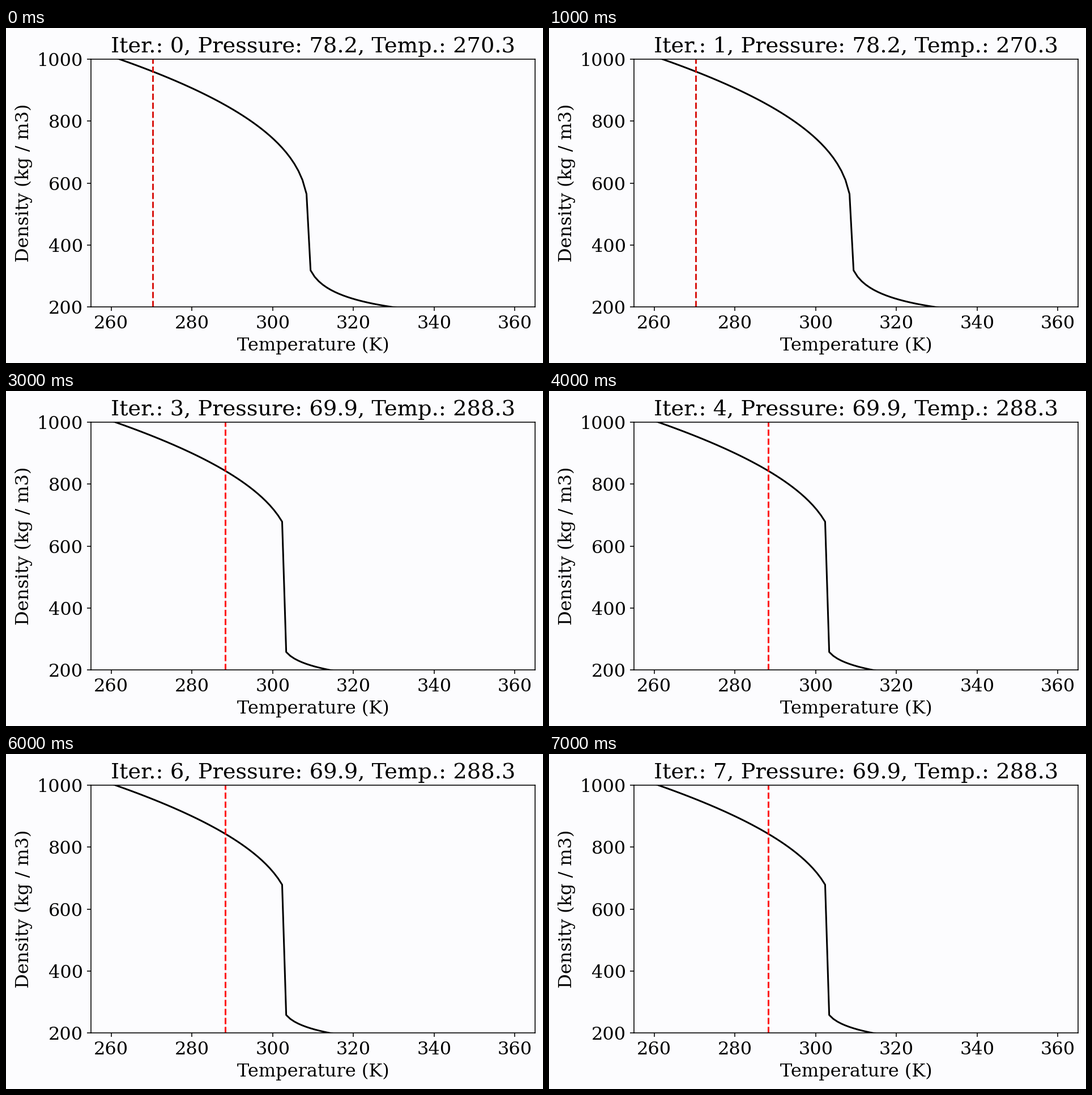
These frames come from a looping animation (948 px wide and 591 px high, 8000 ms). A matplotlib script:

```python
import numpy as np
import matplotlib.pyplot as plt
from matplotlib.animation import FuncAnimation

WIDTH, HEIGHT, DPI = 948, 591, 144
PAPER = "#fcfcfe"
plt.rcParams.update({"font.family": "DejaVu Serif", "font.size": 16})


def branch(t, pole, *points):
    """Density as a quadratic in the cube root of the distance to the pole."""
    knots, rho = np.transpose(points)
    fit = np.polyfit(np.cbrt(abs(knots - pole)), rho, 2)
    return np.polyval(fit, np.cbrt(abs(t - pole)))


def isobar(t, jump, liquid, gas):
    return np.where(t < jump, branch(t, *liquid), branch(t, *gas))


# The one-kelvin sampling gives the jump its slanted edge.
temps = np.linspace(250, 400, 150)
temps = temps[temps < 340]

high = isobar(
    temps, 309,
    (309, (261.8, 1000), (280, 908), (294.9, 800), (302.4, 708),
     (306.4, 641), (308.4, 564)),
    (308, (309.4, 318), (314.4, 254), (320, 227), (329.2, 200)))
low = isobar(
    temps, 303,
    (305, (260.9, 1000), (280, 901), (288.3, 843), (294.8, 784),
     (300, 721), (302.4, 678)),
    (302, (303.4, 257), (306.4, 229.5), (310, 212.5), (314, 200)))

# start iteration, pressure, temperature, density curve, marker colour
states = [(0, 78.2, 270.3, high, "#d81410"),
          (3, 69.9, 288.3, low, "#ff0000")]

fig = plt.figure(figsize=(WIDTH / DPI, HEIGHT / DPI), dpi=DPI, facecolor=PAPER)
ax = fig.add_axes([150 / WIDTH, 99 / HEIGHT, 784 / WIDTH, 437 / HEIGHT],
                  facecolor=PAPER)
ax.set(xlim=(255, 365), ylim=(200, 1000), yticks=range(200, 1001, 200),
       xlabel="Temperature (K)", ylabel="Density (kg / m3)")
curve, = ax.plot([], [], "k-", lw=1.5)
marker = ax.axvline(270.3, ls="--", lw=1.5)


def update(i):
    _, bar, temp, rho, color = [s for s in states if s[0] <= i][-1]
    curve.set_data(temps, rho)
    marker.set_xdata([temp, temp])
    marker.set_color(color)
    ax.set_title(f"Iter.: {i}, Pressure: {bar}, Temp.: {temp}")
    return curve, marker


anim = FuncAnimation(fig, update, frames=8, interval=1000, repeat=True)
plt.show()
```
